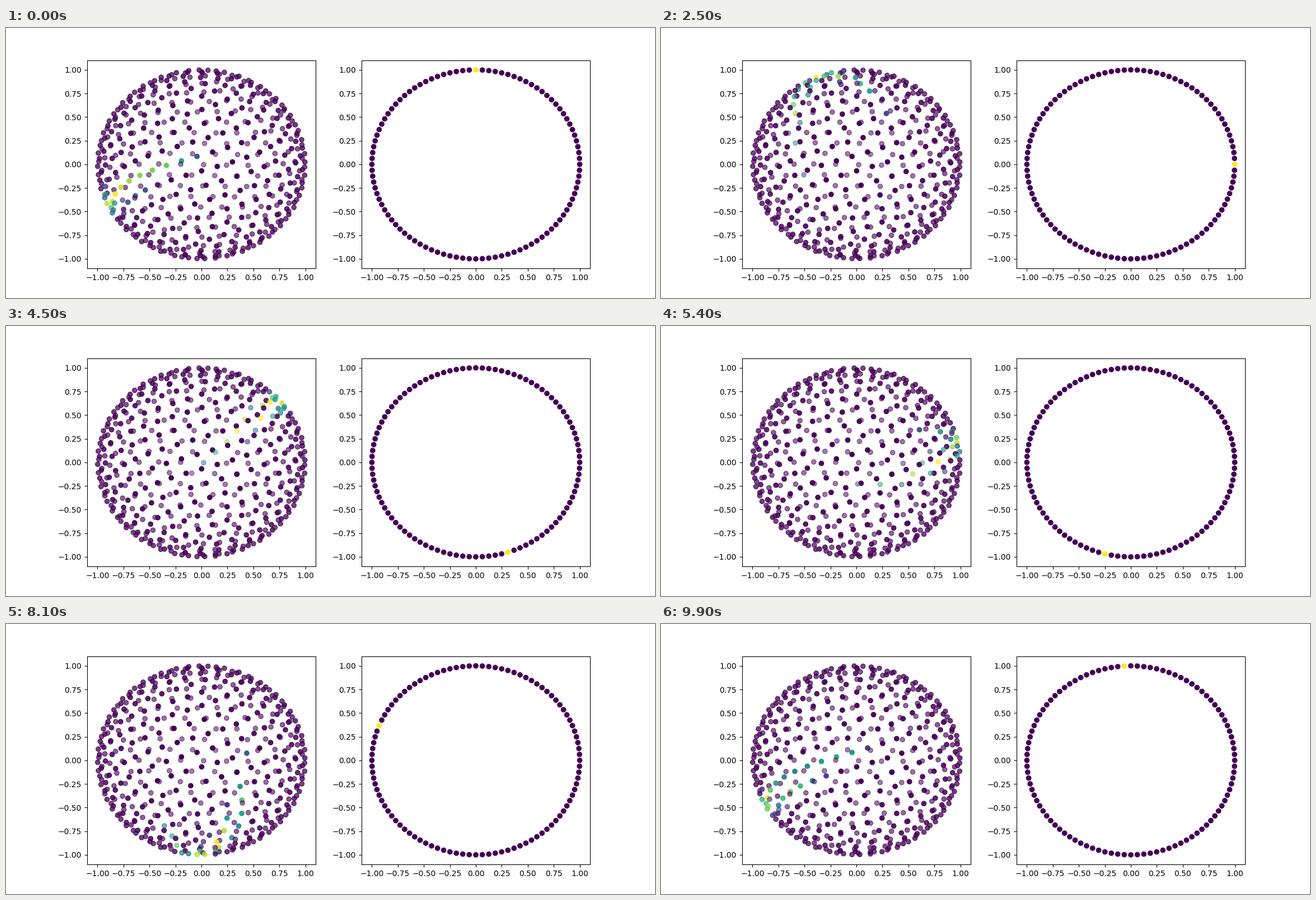
A matplotlib script that plays this animation: 1159x483 px, repeating every 10000 ms.

```python
import numpy as np
import matplotlib.pyplot as plt
from matplotlib.animation import FuncAnimation

W, H, DPI = 1159, 483, 100
N_SPHERE, N_CIRCLE = 500, 100
GOLDEN = np.pi * (1 + 5 ** 0.5)
TILT = np.radians(-15)          # lean of the spiral's axis in the picture
POLE = np.array([0.42, 0.33, 0.845])
START = 165.0                   # azimuth lit by the first circle point, degrees
WIDTH = 4.6                     # spread of the lit meridian, degrees


def unit(v):
    return v / np.linalg.norm(v)


def spiral_sphere(n):
    """Evenly spread points on a golden spiral around a leaning axis."""
    k = np.arange(n)
    y = 1 - (2 * k + 1) / n
    r = np.sqrt(1 - y * y)
    a = GOLDEN * (k - 232) - 0.063
    x, z = r * np.sin(a), r * np.cos(a)
    c, s = np.cos(TILT), np.sin(TILT)
    return np.column_stack([c * x - s * y, s * x + c * y, z])


def polar(points, pole):
    """Azimuth in degrees around the pole, and distance from its axis."""
    v = unit(np.cross([0, 0, 1], pole))
    u = np.cross(v, unit(pole))
    a, b = points @ u, points @ v
    return np.degrees(np.arctan2(b, a)), np.hypot(a, b)


sphere = spiral_sphere(N_SPHERE)
azimuth, reach = polar(sphere, POLE)
turn = 2 * np.pi * np.arange(N_CIRCLE) / N_CIRCLE


def sphere_values(i):
    """Light the half great circle that belongs to circle point i."""
    delta = (azimuth - START + 360 * i / N_CIRCLE + 180) % 360 - 180
    w = reach * np.exp(-0.5 * (delta / WIDTH) ** 2)
    w[w < 0.08] = 0
    return w / w.max()


def circle_values(i):
    return (np.arange(N_CIRCLE) == i).astype(float)


fig, (left, right) = plt.subplots(1, 2, figsize=(W / DPI, H / DPI), dpi=DPI)
style = dict(cmap="viridis", vmin=0, vmax=1)
ball = left.scatter(sphere[:, 0], sphere[:, 1], c=sphere_values(0),
                    alpha=0.75 + 0.25 * sphere[:, 2], **style)
ring = right.scatter(np.sin(turn), np.cos(turn), c=circle_values(0), **style)
for ax in (left, right):
    ax.set(xlim=(-1.1, 1.1), ylim=(-1.1, 1.1))


def update(i):
    ball.set_array(sphere_values(i))
    ring.set_array(circle_values(i))
    return ball, ring


anim = FuncAnimation(fig, update, frames=N_CIRCLE, interval=100,
                     repeat=True, repeat_delay=0)
plt.show()
```
